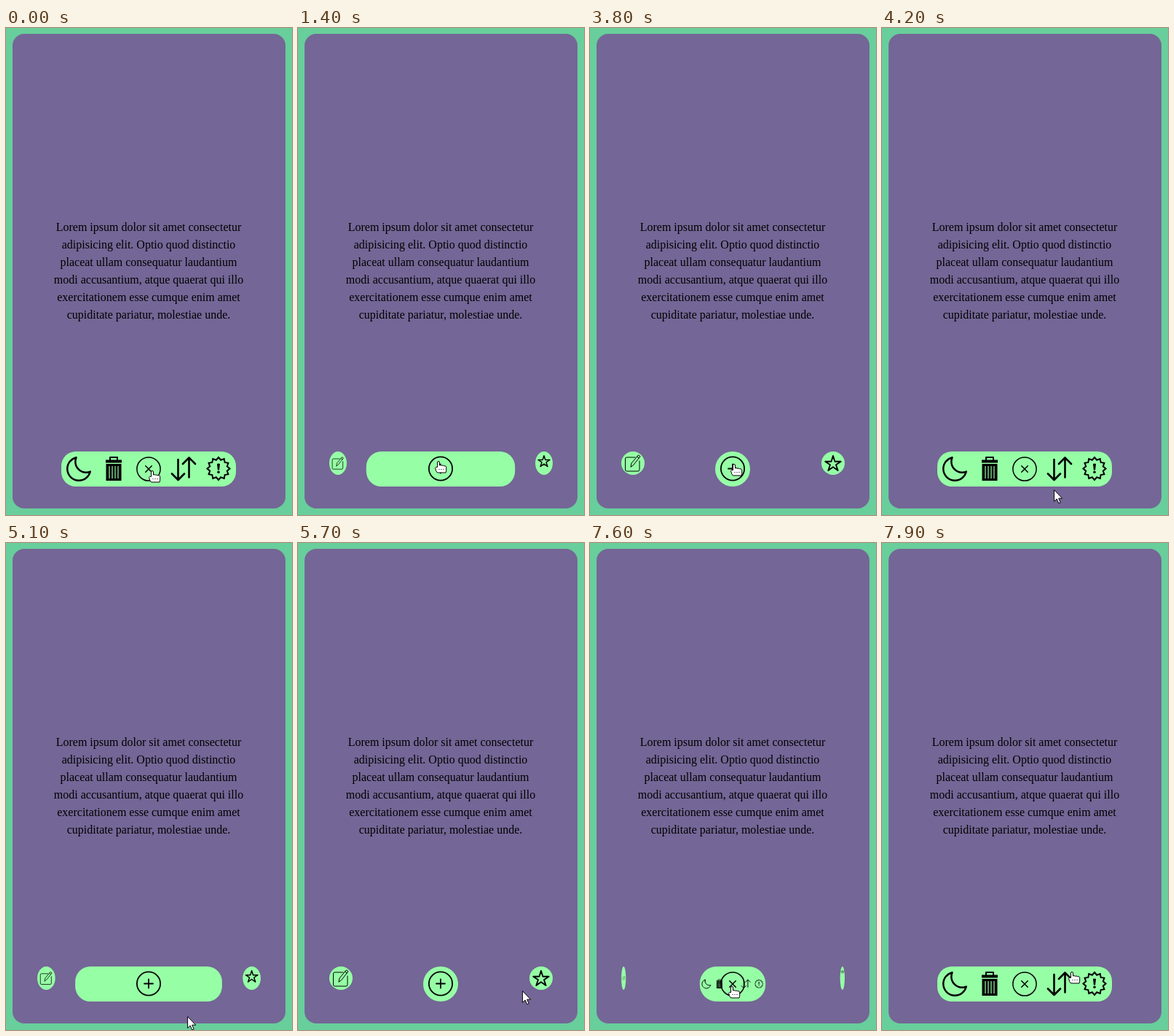
Animation of 393x667 px, one loop 8 s. Source, as an HTML page:

```html
<!DOCTYPE html>
<html lang="en">
<head>
<meta charset="utf-8">
<title>Expanding toolbar</title>
<style>
  html, body { margin: 0; width: 100%; height: 100%; overflow: hidden; background: #68ce9b; }
  svg { display: block; width: 393px; height: 667px; }
  text { font: 16px "Liberation Serif", serif; text-anchor: middle; }
  .mint { fill: #96ffa6; }
  .line { fill: none; stroke: #000; stroke-linejoin: round; stroke-linecap: round; }
  .cursor { fill: #fff; stroke: #000; stroke-linejoin: round; }
</style>
</head>
<body>
<svg viewBox="0 0 393 667">
  <rect x="9" y="8" width="375" height="650" rx="16" fill="#746696"/>
  <g id="copy"></g>

  <ellipse id="leftDisc" class="mint" cy="596" ry="16"/>
  <g id="edit" class="line" stroke-width="1">
    <path d="M3-8H-8.5q-2 0-2 2V9q0 2 2 2H7q2 0 2-2V-3"/>
    <path d="M-3 5l1-5L7.5-11.2 10-9.2 1 2.2zM5.5-9l2.6 2"/>
  </g>

  <ellipse id="rightDisc" class="mint" cy="596" ry="16"/>
  <g id="star" class="line" stroke-width="40">
    <path transform="scale(.048) translate(-256 -256)" d="M480 208H308L256 48l-52 160H32l140 96-54 160 138-100 138 100-54-160z"/>
  </g>

  <rect id="bar" class="mint" y="580" height="48"/>
  <g id="tools">
    <path class="line" stroke-width="32" transform="translate(-96 0) scale(.0769) translate(-256 -256)"
      d="M195 125c0-26.3 5.3-51.3 14.9-74.1C118.7 73 51 155.1 51 253c0 114.8 93.2 208 208 208 97.9 0 180-67.7 202.1-158.9-22.8 9.6-47.9 14.9-74.1 14.9-106 0-192-86-192-192z"/>
    <g transform="translate(-48 0)">
      <path class="line" stroke-width="2" d="M-5-12v-4H5v4"/>
      <path d="M-11-12.5h22v4h-22zM-10.5-7h21v23h-21z"/>
      <path stroke="#96ffa6" stroke-width="1.2" d="M-6-4v17M-2-4v17M2-4v17M6-4v17"/>
    </g>
    <path class="line" stroke-width="2.6" d="M40.5-13v28M32 6.5l8.5 8.5L49 6.5M55.5 11.5v-27M47-7l8.5-8.5L64-7"/>
    <g transform="translate(96 -.5)">
      <path id="burst" class="line" stroke-width="2" style="stroke-linejoin:miter"/>
      <path d="M-2-6.5q2-1.2 4 0L1.1 2h-2.2z"/>
      <circle cy="4.8" r="1.8"/>
    </g>
  </g>
  <g id="toggle" class="line">
    <circle r="16.1"/>
    <path d="M-6 0H6M0-6V6"/>
  </g>

  <path id="arrow" class="cursor" d="M.6.7V16.4l3.6-3.4 2.6 5.9 2.4-1-2.5-5.7h5z"/>
  <g id="hand" class="cursor">
    <path d="M3.5 8.5V2a1.5 1.5 0 0 1 3 0v4q1.5-1 3 .3 1.5-.8 3 .4 2.8-.5 3.2 1.5v5l-.7 2.8H3.5l-1.8-2.5L.6 9.500q.2-1.600 2.900-1z"/>
    <path fill="none" stroke-dasharray="1 2" d="M5.500 11.500h8"/>
  </g>
</svg>
<script>
const LOOP = 8000, STEP = 100, CX = 196;
const LINES = [
  'Lorem ipsum dolor sit amet consectetur',
  'adipisicing elit. Optio quod distinctio',
  'placeat ullam consequatur laudantium',
  'modi accusantium, atque quaerat qui illo',
  'exercitationem esse cumque enim amet',
  'cupiditate pariatur, molestiae unde.'
];
// Moments at which the toolbar flips; it starts open.
const TOGGLES = [-1000, 1355, 3905, 5053, 7550];
// time, x, y, pointer; positions between "move" rows are interpolated.
const POINTER = [
  [0, 196, 606, 'hand'], [200, 196, 606, 'hand'], [300, 190, 594, 'hand'],
  [400, 184, 576, 'arrow'], [500, 184, 576, 'arrow'], [600, 181, 558, 'arrow'],
  [700, 181, 558, 'arrow'], [800, 183, 571, 'arrow'], [900, 186, 592, 'hand'],
  [1000, 186, 592, 'hand'], [1100, 188, 593, 'hand'], [1400, 188, 593, 'hand'],
  [1600, 190, 553, 'arrow'], [2000, 191, 482, 'arrow'], [2200, 191, 475, 'arrow'],
  [2300, 191, 475, 'arrow'], [2400, 191, 474, 'arrow'], [2700, 191, 474, 'arrow'],
  [2800, 190, 474, 'arrow'], [3300, 190, 474, 'arrow'], [3500, 193, 570, 'arrow'],
  [3600, 194, 598, 'hand'], [3700, 194, 598, 'hand'], [3800, 193, 597, 'hand'],
  [4000, 197, 602, 'hand'], [4200, 236, 632, 'arrow'], [4600, 236, 632, 'arrow'],
  [4900, 249, 648, 'arrow'], [5100, 249, 648, 'arrow'], [5800, 318, 607, 'hand'],
  [5900, 325, 601, 'hand'], [6000, 322, 602, 'hand'], [6100, 322, 602, 'hand'],
  [6200, 290, 599, 'arrow'], [6500, 82, 580, 'arrow'], [6600, 61, 580, 'hand'],
  [6700, 61, 580, 'hand'], [6800, 62, 580, 'hand'], [6900, 80, 586, 'arrow'],
  [7200, 168, 606, 'hand'], [7400, 188, 607, 'hand'], [7600, 190, 607, 'hand'],
  [7800, 240, 629, 'arrow'], [7900, 256, 587, 'hand']
];

const $ = id => document.getElementById(id);
const set = (id, attrs) => {
  for (const key in attrs) $(id).setAttribute(key, attrs[key]);
};
const lerp = (a, b, p) => a + (b - a) * p;

// CSS "ease": cubic-bezier(.25, .1, .25, 1)
function ease(x) {
  if (x >= 1) return 1;
  const curve = (a, b, u) => 3 * a * u * (1 - u) ** 2 + 3 * b * u * u * (1 - u) + u ** 3;
  let lo = 0, hi = 1;
  for (let i = 0; i < 24; i++) {
    const mid = (lo + hi) / 2;
    if (curve(.25, .25, mid) < x) lo = mid; else hi = mid;
  }
  return curve(.1, 1, lo);
}

function pointerAt(t) {
  const i = POINTER.findLastIndex(row => row[0] <= t);
  const a = POINTER[i], b = POINTER[i + 1] || a;
  const p = b === a ? 0 : (t - a[0]) / (b[0] - a[0]);
  return { x: Math.round(lerp(a[1], b[1], p)), y: Math.round(lerp(a[2], b[2], p)), kind: a[3] };
}

function draw(t) {
  const flip = TOGGLES.findLastIndex(at => at <= t);
  const open = flip % 2 === 0;
  const since = t - TOGGLES[flip];
  const amount = duration => open ? ease(since / duration) : 1 - ease(since / duration);

  const wide = amount(300), width = lerp(48, 240, wide);
  set('bar', { x: CX - width / 2, width, rx: lerp(24, 20, wide) });
  set('tools', {
    visibility: open ? 'visible' : 'hidden',
    transform: `translate(${CX} 604) scale(${width / 240})`
  });
  set('toggle', {
    'stroke-width': open ? 1.5 : 1.8,
    transform: `translate(${CX} ${open ? 604 : 603.5}) rotate(${open ? 45 : 0})`
  });

  const side = 1 - amount(100), half = 16 * side;
  const visibility = side > .01 ? 'visible' : 'hidden';
  set('leftDisc', { cx: 43 + half, rx: half, visibility });
  set('rightDisc', { cx: 350 - half, rx: half, visibility });
  set('edit', { visibility, transform: `translate(${43 + half} 596) scale(${side})` });
  set('star', { visibility, transform: `translate(${350 - half} ${585 + 11 * side}) scale(${side})` });

  const { x, y, kind } = pointerAt(t);
  for (const id of ['arrow', 'hand'])
    set(id, { visibility: id === kind ? 'visible' : 'hidden', transform: `translate(${x} ${y})` });
}

$('copy').innerHTML = LINES.map((line, i) => `<text x="${CX}" y="${278 + 24 * i}">${line}</text>`).join('');
$('burst').setAttribute('d', 'M' + Array.from({ length: 24 }, (_, i) => {
  const r = i % 2 ? 12.2 : 15.5, a = i * Math.PI / 12;
  return `${(r * Math.sin(a)).toFixed(2)} ${(-r * Math.cos(a)).toFixed(2)}`;
}).join('L') + 'Z');

const start = performance.now();
function tick() {
  const t = (performance.now() - start) % LOOP;
  draw(Math.floor(t / STEP) * STEP);
  requestAnimationFrame(tick);
}
tick();
</script>
</body>
</html>
```
